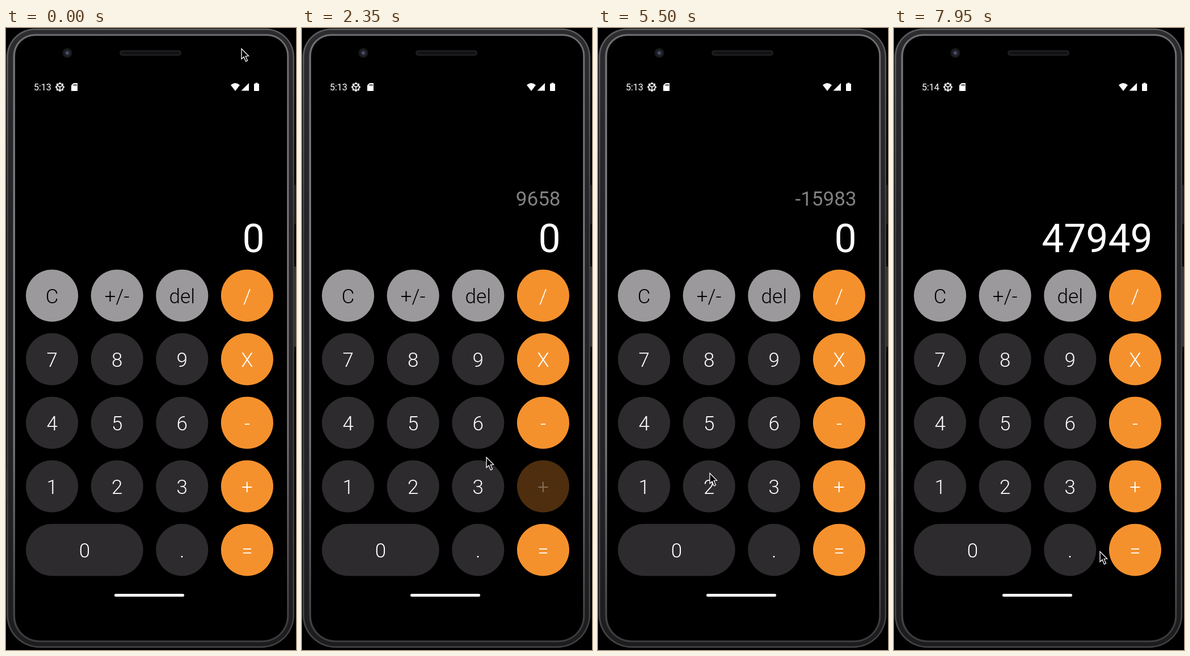
An HTML page with a canvas that plays this animation: 511x1096 px, repeating every 8 s.

```html
<!DOCTYPE html>
<html lang="en">
<head>
<meta charset="utf-8">
<title>Calculator</title>
<style>
html, body { margin: 0; width: 100%; height: 100%; overflow: hidden; background: #000; }
canvas { display: block; }
</style>
</head>
<body>
<canvas id="stage" width="511" height="1096"></canvas>
<script>
const ctx = document.getElementById('stage').getContext('2d');
const LOOP = 8000, STEP = 50, CLOCK_TICK = 5900;
const GRAY = '#9b999b', DARK = '#2d2b2e', ORANGE = '#f5912d';
const ROWS = [['C', '+/-', 'del', '/'], ['7', '8', '9', 'X'], ['4', '5', '6', '-'], ['1', '2', '3', '+'], ['0', '', '.', '=']];

// Pointer stops: x, y, arrival, departure and the key held meanwhile.
const STOPS = [
  [415, 36, 0, 350],
  [305, 576, 1000, 1150, '9'],
  [305, 684, 1320, 1430, '6'],
  [183, 674, 1580, 1750, '5'],
  [190, 580, 1900, 2000, '8'],
  [418, 795, 2160, 2300, '+'],
  [325, 756, 2350, 2350],
  [308, 694, 2450, 2550, '6'],
  [308, 798, 2690, 2800, '3'],
  [197, 798, 2930, 3020, '2'],
  [192, 686, 3130, 3220, '5'],
  [420, 908, 3400, 3600],
  [420, 908, 3600, 3750, '='],
  [195, 468, 4150, 4300, '+/-'],
  [422, 464, 4780, 4930, '/'],
  [197, 784, 5500, 5650, '2'],
  [195, 468, 6180, 6330, '+/-'],
  [421, 906, 6520, 6630, '='],
  [438, 590, 6900, 7030, 'X'],
  [310, 690, 7200, 7310, '6'],
  [421, 906, 7480, 7600, '='],
  [392, 964, 7750, 7770],
  [363, 922, 7950, 8000]
];
const PRESSES = STOPS.filter(s => s[4]).map(([, , down, up, key]) => ({ key, down, up }));
const OPS = { '+': (a, b) => a + b, '-': (a, b) => a - b, 'X': (a, b) => a * b, '/': (a, b) => a / b };

const clamp = v => Math.max(0, Math.min(1, v));
const ease = v => v < 0.5 ? 4 * v ** 3 : 1 - (2 - 2 * v) ** 3 / 2;
const smooth = v => v * v * (3 - 2 * v);

function calculate(t) {
  let entry = '0', stored = '', op = '';
  for (const { key, up } of PRESSES) {
    if (up > t) break;
    if (OPS[key]) {
      [stored, entry, op] = [entry, '0', key];
    } else if (key === '=') {
      entry = String(OPS[op](+stored, +entry));
      stored = '';
    } else if (key === '+/-') {
      entry = String(-entry);
    } else {
      entry = entry === '0' ? key : entry + key;
    }
  }
  return { entry, stored };
}

function pointerAt(t) {
  const i = STOPS.findIndex(s => t <= s[3]);
  const [x, y, arrive] = STOPS[i];
  if (t >= arrive) return [x, y];
  const [px, py, , leave] = STOPS[i - 1];
  const k = smooth((t - leave) / (arrive - leave));
  return [px + (x - px) * k, py + (y - py) * k];
}

function keyAlpha(key, t) {
  return PRESSES.filter(p => p.key === key && t > p.down).reduce((alpha, { down, up }) => {
    const value = t < up ? 1 - 0.8 * ease(clamp((t - down) / 100)) : 0.2 + 0.8 * ease(clamp((t - up) / 150));
    return Math.min(alpha, value);
  }, 1);
}

function pill(x, y, w, h, r, fill, stroke, line = 1) {
  ctx.beginPath();
  ctx.roundRect(x, y, w, h, r);
  if (fill) { ctx.fillStyle = fill; ctx.fill(); }
  if (stroke) { ctx.strokeStyle = stroke; ctx.lineWidth = line; ctx.stroke(); }
}

function poly(points, fill) {
  ctx.beginPath();
  points.forEach(([x, y]) => ctx.lineTo(x, y));
  ctx.closePath();
  ctx.fillStyle = fill;
  ctx.fill();
}

function disc(x, y, r, fill) {
  ctx.beginPath();
  ctx.arc(x, y, r, 0, 7);
  ctx.fillStyle = fill;
  ctx.fill();
}

function text(value, x, y, size, color, align, weight = 400) {
  ctx.font = `${weight} ${size}px Roboto, sans-serif`;
  ctx.textAlign = align;
  ctx.fillStyle = color;
  ctx.fillText(value, x, y);
}

function fade(...colors) {
  const gradient = ctx.createLinearGradient(0, 0, 0, 1092);
  colors.forEach((color, i) => gradient.addColorStop(i / (colors.length - 1), color));
  return gradient;
}

function shell(inset, fill) {
  const top = 50 - inset, bottom = 58 - inset;
  pill(1 + inset, 1 + inset * 0.85, 507 - inset * 1.85, 1091 - inset * 1.7, [top, top, bottom, bottom], fill);
}

function drawPhone() {
  ctx.fillStyle = '#000';
  ctx.fillRect(0, 0, 511, 1096);
  pill(505, 276, 6, 70, 2, '#1b1b1d');
  pill(505, 420, 6, 142, 2, '#343437');
  pill(0, 779, 4, 50, 1, '#161618');
  shell(0, fade('#5c5c60', '#3c3c3f', '#3c3c3f', '#444447'));
  shell(3, fade('#2c2c2f', '#242427', '#242427', '#1c1c1e'));
  shell(11.5, fade('#6e6e73', '#7a7a80', '#737378', '#3a3a3d'));
  shell(15, '#000');

  pill(200, 39, 109, 10, 5, '#1d1b1d');
  pill(204, 42, 101, 4, 2, '#121113');
  disc(108, 44, 8.5, '#19191c');
  disc(108, 44, 5, '#282a38');
  disc(108, 44, 2.2, '#555a78');
  pill(191, 997, 123, 5, 2.5, '#fff');
}

function drawStatus(t) {
  text(t < CLOCK_TICK ? '5:13' : '5:14', 49, 110, 16, '#fff', 'left');
  ctx.save();
  ctx.translate(95, 104);
  ctx.strokeStyle = '#fff';
  ctx.lineWidth = 1.8;
  ctx.beginPath();
  ctx.arc(0, 0, 5.8, 0, 7);
  ctx.stroke();
  for (let i = 0; i < 8; i++) {
    ctx.rotate(Math.PI / 4);
    pill(-1.3, -8, 2.6, 2.5, 0.5, '#fff');
  }
  ctx.lineWidth = 1.5;
  for (let i = 0; i < 3; i++) {
    ctx.beginPath();
    ctx.moveTo(0, 0);
    ctx.lineTo(0, 5);
    ctx.stroke();
    ctx.rotate(Math.PI * 2 / 3);
  }
  ctx.restore();

  poly([[119, 97], [126, 97], [126, 111], [115, 111], [115, 101]], '#fff');
  for (let i = 0; i < 3; i++) pill(119 + i * 2.2, 99, 1.1, 3, 0, '#000');

  ctx.beginPath();
  ctx.moveTo(404, 111);
  ctx.lineTo(396, 100.5);
  ctx.quadraticCurveTo(404, 93.5, 412, 100.5);
  ctx.fillStyle = '#fff';
  ctx.fill();
  poly([[428, 97], [428, 110.5], [414.5, 110.5]], '#fff');
  pill(437, 98, 9, 13, 1.2, '#fff');
  pill(439.5, 96.5, 4, 2, 0, '#fff');
}

function drawKeys(t) {
  ROWS.forEach((row, r) => row.forEach((key, c) => {
    if (!key) return;
    const x = 35.1 + c * 114.6, y = 425.7 + r * 112, width = key === '0' ? 206.6 : 92;
    const fill = c === 3 ? ORANGE : r === 0 ? GRAY : DARK;
    ctx.globalAlpha = keyAlpha(key, t);
    pill(x, y, width, 91.7, 45.85, fill);
    text(key, x + width / 2, y + 59.3, 35, fill === GRAY ? '#000' : '#fff', 'center', 300);
    ctx.globalAlpha = 1;
  }));
}

function drawPointer(t) {
  const [x, y] = pointerAt(t);
  ctx.save();
  ctx.translate(x - 0.5, y - 0.5);
  poly([[0.5, 1], [0.5, 19], [4.6, 15.4], [8, 23.4], [11, 22], [7.7, 14.2], [13, 13.8]], '#000');
  ctx.strokeStyle = '#fff';
  ctx.lineWidth = 1.3;
  ctx.stroke();
  ctx.restore();
}

function draw(now) {
  const t = Math.floor(now % LOOP / STEP) * STEP;
  const { entry, stored } = calculate(t);
  drawPhone();
  drawStatus(t);
  text(stored, 455.5, 313, 35, '#828282', 'right');
  text(entry, 455.5, 395, 69.5, '#fff', 'right');
  drawKeys(t);
  drawPointer(t);
}

const start = performance.now();
function tick() {
  draw(performance.now() - start);
  requestAnimationFrame(tick);
}
tick();
</script>
</body>
</html>
```
